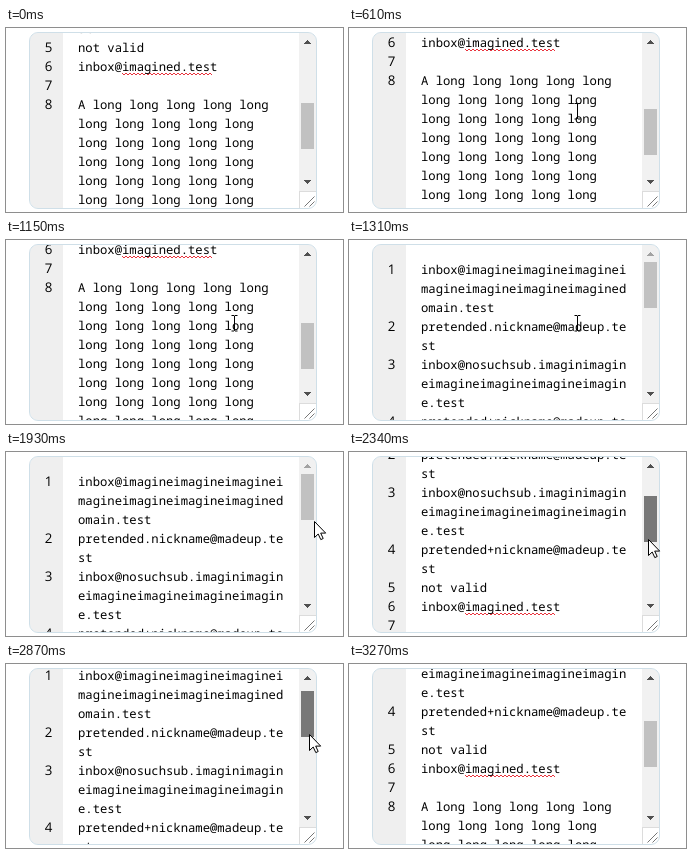
An HTML page that plays this animation: 337x184 px, repeating every 3570 ms.

```html
<!DOCTYPE html>
<html lang="en">
<head>
<meta charset="utf-8">
<title>Numbered text area</title>
<style>
  html, body { margin: 0; width: 100%; height: 100%; overflow: hidden; background: #fff; }
  svg { display: block; width: 100vw; height: 100vh; }
  text {
    font: 12.22px "Noto Sans Mono", "DejaVu Sans Mono", monospace;
    text-rendering: geometricPrecision;
    white-space: pre;
  }
  .number { font: 13.3px "Open Sans", "Noto Sans", sans-serif; text-anchor: middle; }
  .squiggle { fill: none; stroke: #e8323c; stroke-width: 1; }
  .frame { fill: none; stroke: #cfdfe8; }
  .corner { fill: #fff; stroke: #dcdcdc; }
  .grip { fill: none; stroke: #777; }
  .step { shape-rendering: crispEdges; }
  .ibeam { fill: none; stroke: #000; }
  .arrow { fill: #fff; stroke: #000; stroke-linejoin: miter; }
</style>
</head>
<body>
<svg viewBox="0 0 337 184">
  <clipPath id="inside"><rect x="24" y="5" width="286" height="175" rx="8"/></clipPath>
  <g clip-path="url(#inside)">
    <rect x="24" y="5" width="33" height="175" fill="#efefef"/>
    <g id="content"></g>
    <rect x="293" y="5" width="17" height="158" fill="#f1f1f1"/>
    <rect id="thumb" x="295" width="13" height="46"/>
    <path id="up" class="step" d="M297.5 16h8l-4 -4z"/>
    <path id="down" class="step" d="M297.5 152h8l-4 4z"/>
    <rect class="corner" x="293.5" y="163.5" width="17" height="17"/>
    <path class="grip" d="M298.5 178.5l10-10M303.5 178.5l5-5"/>
  </g>
  <rect class="frame" x="23.5" y="4.5" width="287" height="176" rx="8.5"/>
  <path id="ibeam" class="ibeam" d="M-3 -8h2.5l.5 .5l.5 -.5h2.5M0 -7.5v14.5M-3 7.5h2.5l.5 -.5l.5 .5h2.5"/>
  <path id="arrow" class="arrow" d="M.5 .5v16l3.7-3.5l2.6 5.6l2.4-1.1l-2.5-5.4h5z"/>
</svg>
<script>
const LOOP = 3570, TICK = 80;
const ROW = 19, BASELINE = 34, TEXT_X = 72, COLUMNS = 28;
const MAX_SCROLL = 293, THUMB_TOP = 22, THUMB_TRAVEL = 77.6;
const DRAG_START = 2250, DRAG_END = 3110;

const word = 'imagine';
const lines = [
  'inbox@' + word.repeat(7) + 'domain.test',
  'pretended.nickname@madeup.test',
  'inbox@nosuchsub.imagin' + word.repeat(5) + '.test',
  'pretended+nickname@madeup.test',
  'not valid',
  'inbox@imagined.test',
  '',
  'A' + ' long'.repeat(44) + ' input',
  '(555) 555-0142'
];
const misspelledLine = 5;

// The picture holds for one tick at a time; ticks restart at each anchor.
const anchors = [0, 70, 450, 1310, 1930, 2870];

const byId = id => document.getElementById(id);
const [content, thumb, up, down, ibeam, arrow] =
  ['content', 'thumb', 'up', 'down', 'ibeam', 'arrow'].map(byId);

function add(tag, attributes, label = '') {
  const node = document.createElementNS(content.namespaceURI, tag);
  for (const name in attributes) node.setAttribute(name, attributes[name]);
  node.textContent = label;
  content.append(node);
}

function wrap(line) {
  const pattern = new RegExp(`.{1,${COLUMNS}}(?: |$)|.{1,${COLUMNS}}`, 'g');
  return line.match(pattern) || [''];
}

function buildContent() {
  let y = BASELINE;
  lines.forEach((line, index) => {
    add('text', { class: 'number', x: 42.5, y }, index + 1);
    if (index === misspelledLine) {
      const points = Array.from({ length: 46 }, (_, i) => `${116 + i * 2},${y + (i % 2 ? 4 : 2)}`);
      add('polyline', { class: 'squiggle', points: points.join(' ') });
    }
    for (const row of wrap(line)) {
      add('text', { x: TEXT_X, y }, row.trimEnd());
      y += ROW;
    }
  });
}

function hold(time) {
  const anchor = anchors.filter(a => a <= time).pop();
  return anchor + Math.floor((time - anchor) / TICK) * TICK;
}

const progress = (time, start, end) => Math.min(1, Math.max(0, (time - start) / (end - start)));
const smooth = p => p * p * (3 - 2 * p);
const glide = (time, start, end, from, to) =>
  from + (to - from) * smooth(progress(time, start, end));

function scrollAt(time) {
  const move = (from, start, end, to) => glide(time, start, end, from, to);
  let offset = move(200, 530, 770, MAX_SCROLL);
  offset = move(offset, 995, 1310, 0);
  offset = move(offset, 2170, 2490, 168);
  offset = move(offset, 2570, 2870, 18);
  return move(offset, 2870, 3030, 134);
}

// The pointer enters, crosses in a bow, settles on the thumb, follows it and leaves.
function pointerAt(time, offset) {
  const dragged = offset / MAX_SCROLL;
  const move = ([x, y], start, end, [toX, toY]) =>
    [glide(time, start, end, x, toX), glide(time, start, end, y, toY)];
  let point = move([273, 171], 70, 450, [228, 83]);
  point = move(point, 1550, 1930, [308, 69]);
  point[1] += 20 * Math.sin(Math.PI * progress(time, 1550, 1930));
  point = move(point, 1930, 2090, [304 - 16 * dragged, 65 + THUMB_TRAVEL * dragged]);
  return move(point, 3030, 3190, [308, 162]).map(Math.round);
}

function thumbColor(time) {
  if (time >= DRAG_START && time < DRAG_END) return '#787878';
  return time >= 2010 && time < DRAG_START ? '#a8a8a8' : '#c1c1c1';
}

function place(node, x, y, visible = true) {
  node.setAttribute('transform', `translate(${x} ${y})`);
  node.style.display = visible ? '' : 'none';
}

function draw(time) {
  const offset = scrollAt(time);
  const [x, y] = pointerAt(time, offset);
  const pointerShown = time >= 70 && time < 3270;
  const overText = x < 293;

  place(content, 0, -Math.round(offset));
  thumb.setAttribute('y', Math.round(THUMB_TOP + offset / MAX_SCROLL * THUMB_TRAVEL));
  thumb.setAttribute('fill', thumbColor(time));
  up.setAttribute('fill', offset > 0 ? '#505050' : '#a3a3a3');
  down.setAttribute('fill', offset < MAX_SCROLL ? '#505050' : '#a3a3a3');
  place(ibeam, x + .5, y + .5, pointerShown && overText);
  place(arrow, x, y, pointerShown && !overText);
}

function play(now) {
  draw(hold(now % LOOP));
  requestAnimationFrame(play);
}

buildContent();
draw(0);
requestAnimationFrame(play);
</script>
</body>
</html>
```
